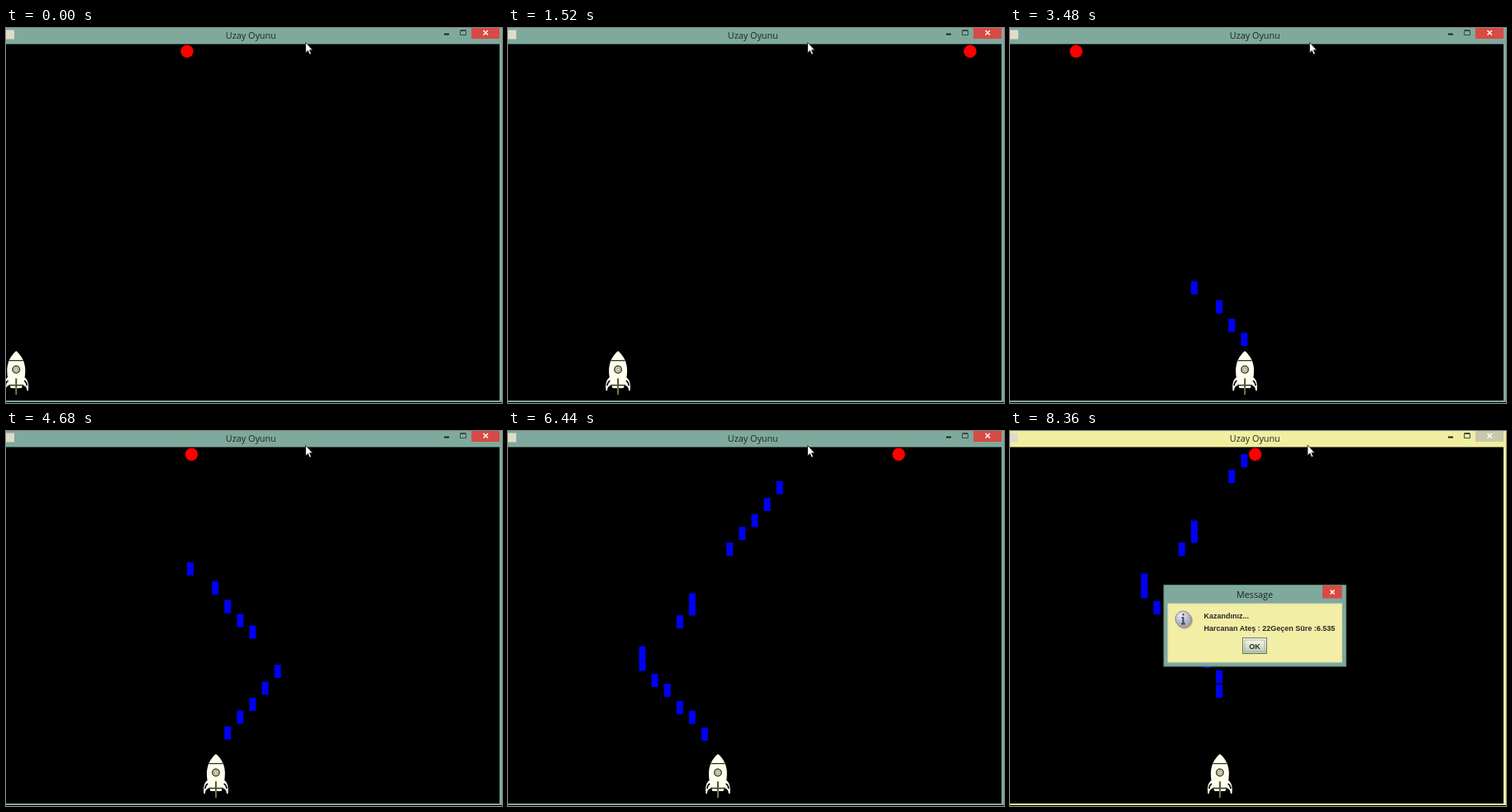
Animation, 600 px wide and 454 px high, one loop 8.4 s. Source, as an HTML page:

```html
<!DOCTYPE html>
<html lang="tr">
<head>
<meta charset="utf-8">
<title>Uzay Oyunu</title>
<style>
  html, body { margin: 0; width: 100%; height: 100%; overflow: hidden; background: #000; }
  svg { display: block; width: 600px; height: 454px; }
  .title { font: 10.8px "Open Sans", sans-serif; text-anchor: middle; fill: #1c2622; }
  .label { font: bold 9px "Liberation Sans", Arial, sans-serif; fill: #2b2b26; }
</style>
</head>
<body>
<svg viewBox="0 0 600 454">
  <defs>
    <linearGradient id="btn" x2="0" y2="1">
      <stop offset="0" stop-color="#fffff0"/>
      <stop offset="1" stop-color="#b4c4a8"/>
    </linearGradient>
    <radialGradient id="ball-info" cx=".4" cy=".3">
      <stop offset="0" stop-color="#f2f2f6"/>
      <stop offset="1" stop-color="#b0b0c4"/>
    </radialGradient>
  </defs>

  <rect width="600" height="454"/>

  <g id="rocket">
    <path d="M-9 31C-14 34-15.5 39-14.6 48L-13 48C-12.8 44-11 41.500-7 41.500L7 41.500C11 41.500 12.800 44 13 48L14.600 48C15.500 39 14 34 9 31Z" fill="#fffff0"/>
    <path d="M-9.500 36C-11.500 37-12.800 39-13 42M9.500 36C11.500 37 12.800 39 13 42" fill="none" stroke="#000" stroke-width="1.600"/>
    <path d="M0 0C7 6 11 14 11 24C11 32 9 38 6.500 45L-6.500 45C-9 38-11 32-11 24C-11 14-7 6 0 0Z" fill="#fffff0"/>
    <path d="M-8.500 11.700H8.500M-9 41.500H9" stroke="#33331c" stroke-width="1.300"/>
    <circle cy="22.500" r="4.200" fill="#fffff0" stroke="#3a3a20" stroke-width="1.500"/>
    <circle cy="22.500" r="2.300" fill="#d8d8c0" stroke="#77774c" stroke-width=".8"/>
    <path d="M0 33V53" stroke="#77774c" stroke-width="2"/>
    <path d="M0 34V44" stroke="#33331c" stroke-width="1"/>
  </g>
  <g id="shots" fill="#0000f4"></g>
  <circle id="ball" cy="28.300" r="7.700" fill="#f00"/>

  <path id="frame" d="M0 0H600V453H0V451H597V19.500H0Z"/>
  <rect y="2.500" width="10" height="11" fill="#dedcc8"/>
  <text class="title" x="296.300" y="12.500">Uzay Oyunu</text>
  <rect x="530" y="6.500" width="6" height="2" fill="#1c2622"/>
  <path d="M549.500 3.500H556.500V8.500H549.500ZM549.500 2.500H556.500" fill="none" stroke="#3a4a44"/>
  <rect id="close" x="563" width="34" height="13"/>
  <path d="M577.500 3L583 8.500M583 3L577.500 8.500" stroke="#fff" stroke-width="1.500"/>

  <g id="dialog">
    <rect x="186" y="186.500" width="220.500" height="98.500" fill="#7fa99c" stroke="#5c8074"/>
    <rect x="191" y="209" width="210.500" height="71" fill="#f2eea6" stroke="#d6dab0"/>
    <text class="title" x="296" y="202">Message</text>
    <rect x="378" y="187" width="23.500" height="15.500" fill="#d84a44"/>
    <path d="M387.500 192.500L392.500 197.500M392.500 192.500L387.500 197.500" stroke="#fff" stroke-width="1.500"/>
    <circle cx="211" cy="229.500" r="10" fill="#a8a68c"/>
    <circle cx="209.500" cy="227.500" r="9.500" fill="url(#ball-info)" stroke="#8c8ca0"/>
    <path d="M209.500 221V223.500M209.500 225.500V233.500M207.500 226H210M207 233.500H212" stroke="#44446a" stroke-width="2"/>
    <text class="label" x="234.500" y="227">Kazandınız...</text>
    <text class="label" x="234.500" y="241.500">Harcanan Ateş : 22Geçen Süre :6.535</text>
    <rect x="281.500" y="250.500" width="29" height="19" fill="url(#btn)" stroke="#6c7868"/>
    <rect x="284" y="253" width="24" height="14" fill="none" stroke="#a8b8a0"/>
    <text class="label" x="296" y="264" text-anchor="middle">OK</text>
  </g>

  <path id="cursor" d="M.5 .5V13L3.300 10.400L5.200 15L7.200 14.200L5.300 9.700H9Z" fill="#fffff0" stroke="#222" stroke-width=".8"/>
</svg>
<script>
const LOOP = 8400, STEP = 40;
const $ = id => document.getElementById(id);

// [time, distance flown by a shot]; the ball covers twice as much
const travel = [[0, 0], [1520, 182], [3480, 421.5], [4680, 569], [5720, 701.5], [7144, 879.5]];

// [time, rocket column]
const moves = [[0, 0], [920, 0], [1520, 8], [1780, 11], [2400, 11], [2640, 14], [2920, 14],
  [3108, 16], [3292, 17], [3431, 18], [3545, 19], [3720, 21], [3932, 21], [4098, 20],
  [4257, 19], [4383, 18], [4538, 17], [4680, 16], [4960, 14], [5112, 14], [5233, 13],
  [5480, 10], [5637, 10], [5720, 11], [5792, 11], [5888, 12], [6056, 13], [6148, 14],
  [6312, 15], [6460, 16]];

// travel distance at which each shot is fired
const fired = [353, 376, 398.5, 415.5, 429.5, 477, 497.5, 517, 532.5, 551.5, 613, 624,
  639.5, 677, 691, 710.5, 722.5, 743.5, 755, 775.5, 794, 811.5];

const LEFT = 4.7, SPAN = 566.3, START = 214.3, COLUMN = 15.1;

function lerp(points, v, from = 0, to = 1) {
  const i = points.findIndex(p => p[from] > v);
  if (i < 0) return points[points.length - 1][to];
  const a = points[Math.max(i - 1, 0)], b = points[i];
  return a[to] + (b[to] - a[to]) * (v - a[from]) / (b[from] - a[from]);
}

const column = t => Math.round(lerp(moves, t));
const mix = (a, b, k) => `rgb(${a.map((c, i) => Math.round(c + (b[i] - c) * k))})`;

const shots = fired.map(d => {
  const el = document.createElementNS("http://www.w3.org/2000/svg", "rect");
  el.setAttribute("width", 8);
  el.setAttribute("height", 16);
  el.setAttribute("x", 7.5 + COLUMN * column(lerp(travel, d, 1, 0)));
  $("shots").append(el);
  return { el, d };
});

function draw(t) {
  const dist = lerp(travel, t);

  const p = (START + 2 * dist) % (2 * SPAN);
  $("ball").setAttribute("cx", LEFT + Math.min(p, 2 * SPAN - p));
  $("rocket").setAttribute("transform", `translate(${12.3 + COLUMN * column(t)} 391)`);

  for (const { el, d } of shots) {
    const y = 375 - (dist - d);
    el.setAttribute("y", y);
    el.style.display = dist >= d && y > 20 ? "" : "none";
  }

  const k = Math.min(Math.max((t - 7520) / 200, 0), 1);
  $("frame").setAttribute("fill", mix([127, 169, 156], [242, 238, 160], k));
  $("close").setAttribute("fill", mix([216, 74, 68], [200, 200, 172], k));
  const s = 0.92 + 0.08 * k;
  $("dialog").setAttribute("opacity", k);
  $("dialog").setAttribute("transform", `translate(296 236) scale(${s}) translate(-296 -236)`);

  $("cursor").setAttribute("transform", t < 8320 ? "translate(362 17)" : "translate(359.500 16.500)");
}

const begin = performance.now();
function tick() {
  const t = Math.floor((performance.now() - begin) % LOOP / STEP) * STEP;
  draw(t < 80 ? 0 : t);
  requestAnimationFrame(tick);
}
tick();
</script>
</body>
</html>
```
